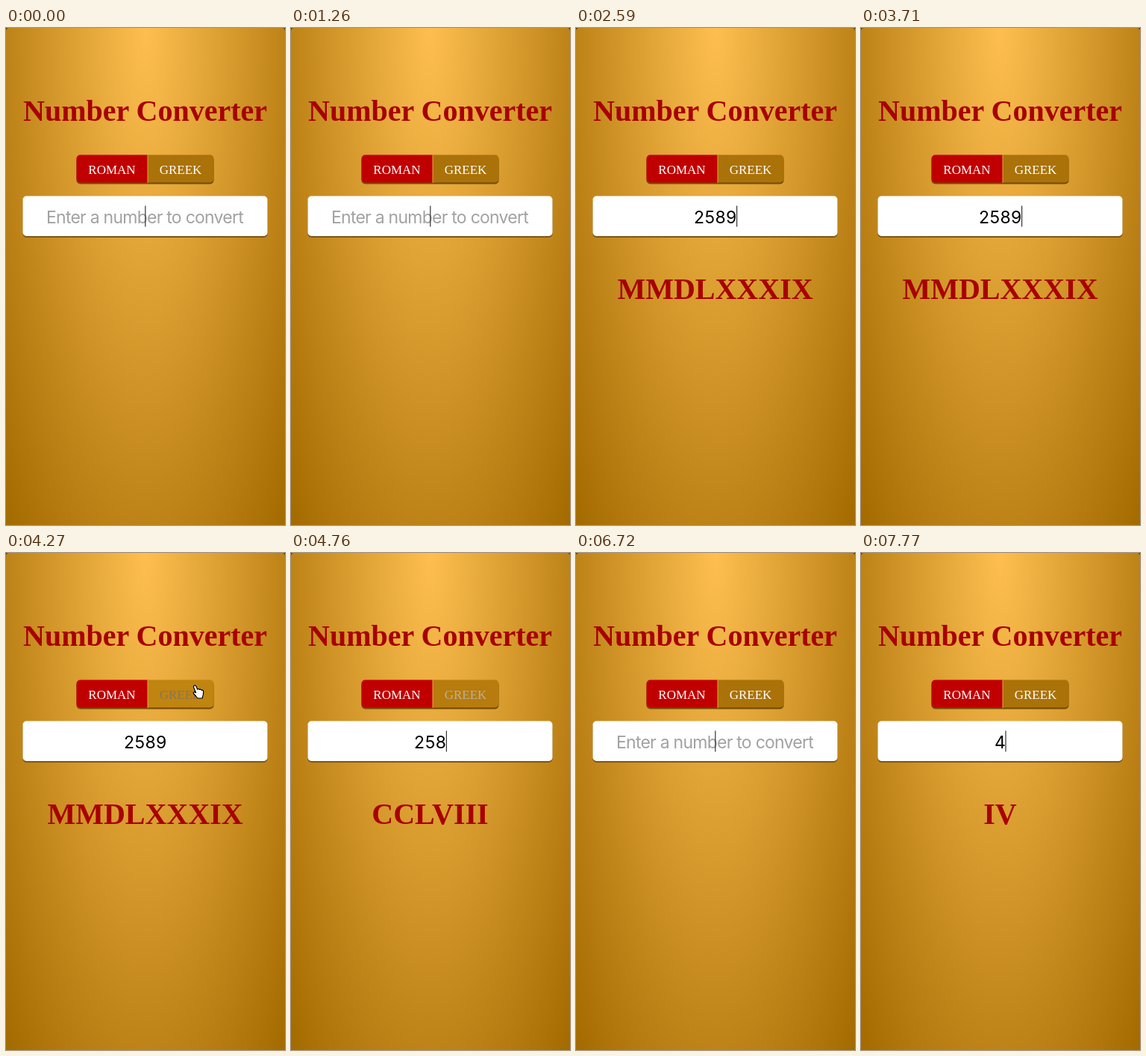
Recreate the animation shown at these times as an HTML page. Size 374x664 px, loop 8 s.

```html
<!DOCTYPE html>
<html lang="en">
<head>
<meta charset="utf-8">
<title>Number Converter</title>
<style>
  html, body { margin: 0; width: 100%; height: 100%; overflow: hidden; background: #4a3208; }
  svg {
    display: block; width: 374px; height: 664px;
    border-radius: 4px 4px 0 0;
    background: radial-gradient(ellipse at top, #febf50, #a36a00);
  }
  text { text-anchor: middle; }
  .big { font: bold 40px "Liberation Serif", "Times New Roman", serif; fill: #a80000; }
  .label { font: 17px "Liberation Serif", "Times New Roman", serif; fill: #fff; }
  .field { font: 23px Inter, Roboto, sans-serif; }
  #hint { fill: #a2a2a2; letter-spacing: -0.75px; }
</style>
</head>
<body>
<svg viewBox="0 0 374 664">
  <text class="big" x="186.5" y="124">Number Converter</text>

  <rect x="94.5" y="171.5" width="184" height="37" rx="5" fill="#704a08"/>
  <path d="M190 169.5H99.5a5 5 0 0 0-5 5V201.500a5 5 0 0 0 5 5H190Z" fill="#c00000"/>
  <path id="greek" d="M190 169.500H273.500a5 5 0 0 1 5 5V201.500a5 5 0 0 1-5 5H190Z"/>
  <path d="M190 169.500V207" stroke="#e3a548"/>
  <text class="label" x="142" y="195">ROMAN</text>
  <text class="label" id="greekLabel" x="234" y="195">GREEK</text>

  <rect x="22.500" y="226" width="328" height="54" rx="5" fill="#7d5615"/>
  <rect x="22.500" y="224.500" width="328" height="53.500" rx="5" fill="#fff"/>
  <text class="field" id="hint" x="186" y="261">Enter a number to convert</text>
  <text class="field" id="digits" y="261"></text>
  <rect id="caret" y="237.500" width="1.200" height="28" fill="#333"/>

  <text class="big" id="result" x="186.500" y="362"></text>

  <path id="hand" fill="#fff" stroke="#000" stroke-width="1.200" stroke-linejoin="round"
    d="M2.200 1.200C3.400.4 4.600 1 5.200 2.600L6.600 6.200C7.600 5.200 9 5.600 9.400 6.600 10.400 5.800 11.800 6.200 12.200 7.400 13.400 6.800 14.600 7.600 14.600 9L14.400 13C14 15 13.400 16 13.200 18H6.600C5.600 16 3.400 14 1.600 12 .6 10.800 1.600 9.400 3 9.800L4.600 10.800 1.600 3.600C1.200 2.600 1.400 1.800 2.200 1.200Z"/>
</svg>
<script>
const LOOP = 8000, MID = 186.5, DIGIT = 14.4;
const $ = id => document.getElementById(id);

// [time, value]
const typed = [[0, ''], [1470, '2'], [1750, '25'], [2030, '258'], [2590, '2589'],
  [4760, '258'], [5250, '25'], [5670, '2'], [6440, ''], [7770, '4']];
const shown = typed.map(([t, v]) => [t === 2030 ? 2100 : t, v]);
const caretOff = [[560, 1050], [3150, 3640], [4130, 4550], [5040, 5250], [6230, 6440], [7000, 7490]];
// [time, x, y]
const path = [[3920, 362, 168], [4130, 258, 180], [4270, 250, 176], [4480, 250, 176], [4690, 362, 168]];

const clamp = v => Math.max(0, Math.min(1, v));
const ease = v => v * v * (3 - 2 * v);
const valueAt = (steps, t) => steps.filter(s => s[0] <= t).pop()[1];
const mix = (a, b, k) => `rgb(${a.map((v, i) => Math.round(v + (b[i] - v) * k))})`;

function roman(n) {
  const values = [1000, 900, 500, 400, 100, 90, 50, 40, 10, 9, 5, 4, 1];
  const marks = 'M CM D CD C XC L XL X IX V IV I'.split(' ');
  return values.reduce((out, v, i) => {
    const count = Math.floor(n / v);
    n -= count * v;
    return out + marks[i].repeat(count);
  }, '');
}

function handAt(t) {
  const i = path.findIndex(p => p[0] > t);
  if (i < 1) return null;
  const [a, b] = [path[i - 1], path[i]];
  const k = ease((t - a[0]) / (b[0] - a[0]));
  return [a[1] + (b[1] - a[1]) * k, a[2] + (b[2] - a[2]) * k];
}

function draw(t) {
  const value = valueAt(typed, t), n = value.length;
  $('digits').textContent = value;
  $('digits').setAttribute('x', [...value].map((_, i) => MID + (i - (n - 1) / 2) * DIGIT).join(' '));
  $('hint').style.display = n ? 'none' : '';
  $('result').textContent = roman(+valueAt(shown, t));

  $('caret').setAttribute('x', MID - 0.3 + n * DIGIT / 2);
  $('caret').style.display = caretOff.some(([a, b]) => t >= a && t < b) ? 'none' : '';

  const hover = clamp((t - 4020) / 230) - clamp((t - 4660) / 240);
  $('greek').style.fill = mix([170, 114, 8], [192, 132, 16], hover);
  $('greekLabel').style.fill = mix([255, 255, 255], [136, 118, 84], hover);

  const hand = handAt(t);
  $('hand').style.display = hand ? '' : 'none';
  if (hand) $('hand').setAttribute('transform', `translate(${hand})`);
}

const start = performance.now();
function frame() {
  draw((performance.now() - start) % LOOP);
  requestAnimationFrame(frame);
}
draw(0);
requestAnimationFrame(frame);
</script>
</body>
</html>
```
